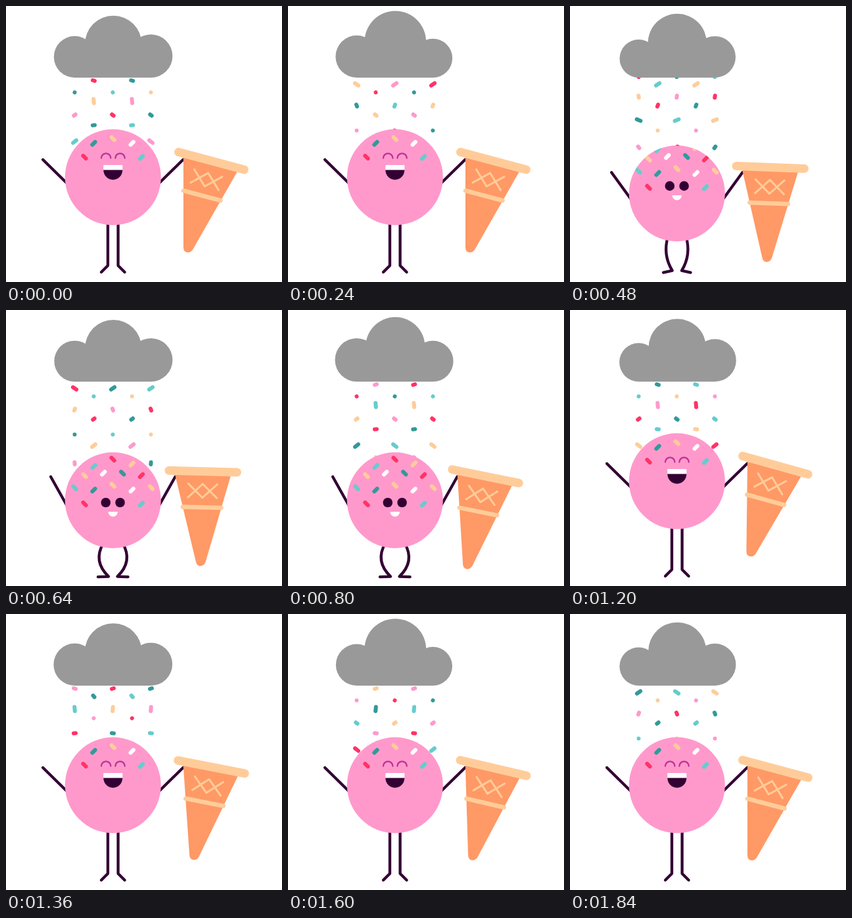
Recreate the animation shown at these times as an HTML page. Size 420 by 420 pixels, loop 1920 ms.

```html
<!DOCTYPE html>
<html lang="en">
<head>
<meta charset="utf-8">
<title>Sprinkle shower</title>
<style>
  html, body { margin: 0; width: 100%; height: 100%; overflow: hidden; background: #fff; }
  svg { display: block; width: 100%; height: 100%; }
</style>
</head>
<body>
<svg viewBox="0 0 420 420" fill="none" stroke-linecap="round" stroke-linejoin="round">
  <defs>
    <clipPath id="ballClip"><circle cx="162.8" cy="260.5" r="73"/></clipPath>
  </defs>
  <g id="rain" stroke-width="6"></g>
  <g fill="#999">
    <circle id="puffLeft" cx="104.5"/>
    <circle id="puffTop" cx="163.3"/>
    <circle id="puffRight" cx="220.5"/>
    <rect x="104.5" y="75" width="116" height="34"/>
  </g>
  <path id="limbs" stroke="#330033" stroke-width="4.3"/>
  <g id="ball">
    <circle cx="162.8" cy="260.5" r="73" fill="#ff99cc"/>
    <g clip-path="url(#ballClip)">
      <g id="skin">
        <g id="toppings" stroke-width="6"></g>
        <g id="laugh">
          <path d="M145 231.5a7.2 7.2 0 0 1 14.4 0M166.4 231.5a7.2 7.2 0 0 1 14.4 0" stroke="#bb3399" stroke-width="2.3"/>
          <path d="M148.3 242h29v8h-29z" fill="#fff"/>
          <path d="M148.3 249.5h29a14.5 15 0 0 1-29 0z" fill="#330033"/>
        </g>
        <g id="smile">
          <g fill="#330033"><circle cx="151.8" cy="228" r="7.3"/><circle cx="173.6" cy="228" r="7.3"/></g>
          <path d="M155.6 242h14.4a7.2 7.5 0 0 1-14.4 0z" fill="#fff"/>
        </g>
      </g>
    </g>
  </g>
  <g id="cone">
    <path d="M270 230V367Q270 375 277 375Q281 375 284 371L352 252Z" fill="#ff9966"/>
    <g stroke="#ffcc99">
      <path d="M262.5 222.3L362.5 249" stroke-width="13"/>
      <path d="M270 281L326.5 296" stroke-width="6.6"/>
      <path d="M-22 10.5L0-10.5L22 10.5M-22-10.5L0 10.5L22-10.5" stroke-width="3" transform="translate(305 264.3) rotate(15)"/>
    </g>
  </g>
</svg>
<script>
const LOOP = 1920, STEP = 80, CENTER = 162.8;
const TEAL = '#339999', CREAM = '#ffcc99', RED = '#ff3366', AQUA = '#66cccc', PINK = '#ff99cc', WHITE = '#fff';
const RAIN_COLORS = [TEAL, CREAM, RED, AQUA, PINK];
// x, cycle offset, colour offset, tumble direction
const COLUMNS = [[104.5, .8, 0, -1], [133.5, .2, 2, 1], [162.5, .8, 3, 1], [191.8, .2, 0, 1], [220.5, .8, 1, 1]];
const TOPPINGS = [
  [119.5, 230, RED, 1], [206, 230.5, AQUA, -1],
  [133.5, 209, TEAL, -1], [162.7, 201.7, CREAM, 1], [191.7, 209, WHITE, -1],
  [104.5, 205.5, AQUA, 1], [221, 205.3, CREAM, 1],
  [119.5, 187, CREAM, 1], [148.2, 183.2, WHITE, -1], [177.3, 183.2, TEAL, 1], [206, 187, RED, -1],
  [133.7, 173, AQUA, -1], [162.6, 162, RED, 1], [191.7, 169.3, CREAM, -1]
];
const CONE_SWING = [[0, 15], [240, 15], [560, 0], [1040, 23], [1320, 11], [1840, 15], [1920, 15]];

const el = id => document.getElementById(id);
const ramp = (t, from, to) => (1 - Math.cos(Math.PI * Math.min(1, Math.max(0, (t - from) / (to - from))))) / 2;
const mod = (a, n) => (a % n + n) % n;

function sprinkle(x, y, length, angle, color) {
  const h = length / 2;
  return `<path d="M${-h} 0H${h + .01}" stroke="${color}" transform="translate(${x} ${y}) rotate(${angle})"/>`;
}

function rain(t) {
  let out = '';
  for (const [x, start, shift, side] of COLUMNS) {
    const cycle = t / 400 + start;
    for (let k = 0; k < 4; k++) {
      const n = Math.floor(cycle + 1e-6) - k, age = cycle - n;
      const y = 108 + 27 * age + 2.9 * age * age;
      const length = 3.1 + 3.1 * Math.cos(2 * Math.PI * (age - .4) / .8);
      const turn = side * (mod(n, 5) % 3 ? -1 : 1);
      out += sprinkle(x, y, length, turn * (3 + 77 * age), RAIN_COLORS[mod(n + shift, 5)]);
    }
  }
  return out;
}

function puff(id, r, bottom) {
  el(id).setAttribute('r', r);
  el(id).setAttribute('cy', bottom - r);
}

function swing(t) {
  const i = CONE_SWING.findIndex(key => key[0] > t);
  const [t0, a] = CONE_SWING[i - 1], [t1, b] = CONE_SWING[i];
  return a + (b - a) * ramp(t, t0, t1);
}

function limbs(drop, nod) {
  const bend = Math.min(nod, drop * 1.25);
  const hand = [CENTER - 56.3 - 50.4 + nod / 3, 233.7 + drop - nod / 4];
  const hip = [155 - drop * .24, 326 + drop];
  const ankle = [155 + bend * .03, 395 + bend * .15 + drop * .18];
  const knee = [2 * (155 - drop * .1 - bend * .28) - (hip[0] + ankle[0]) / 2, (hip[1] + ankle[1]) / 2 + 2];
  const toe = [145 - bend * .14, 405 + bend * .03];
  const half = flip => {
    const p = ([x, y]) => `${flip ? 2 * CENTER - x : x} ${y}`;
    return `M${p(hand)}L${p([94, 271 + drop])}M${p(hip)}Q${p(knee)} ${p(ankle)}L${p(toe)}`;
  };
  el('limbs').setAttribute('d', half(false) + half(true));
  return [2 * CENTER - hand[0], hand[1]];
}

function draw(t) {
  const drop = 29 * (ramp(t, 240, 560) - ramp(t, 800, 1120));
  const nod = 36 * (ramp(t, 280, 640) - ramp(t, 840, 1200));
  const wave = lead => Math.cos(2 * Math.PI * (t * 3 / 2000 - lead));

  puff('puffLeft', 31 + 2 * wave(.2), 109);
  puff('puffTop', 45 + 2 * wave(.44), 101);
  puff('puffRight', 31.2 - 1.8 * wave(.44), 109);
  el('rain').innerHTML = rain(t);

  const [hx, hy] = limbs(drop, nod);
  el('ball').setAttribute('transform', `translate(0 ${drop})`);
  el('skin').setAttribute('transform', `translate(0 ${nod})`);
  const calm = t >= 400 && t < 1000;
  el('smile').setAttribute('display', calm ? 'inline' : 'none');
  el('laugh').setAttribute('display', calm ? 'none' : 'inline');
  el('cone').setAttribute('transform', `translate(${hx} ${hy}) rotate(${swing(t) - 15}) translate(-269.5 -233.7)`);
}

el('toppings').innerHTML = TOPPINGS.map(([x, y, color, lean]) => sprinkle(x, y, 6, 45 * lean, color)).join('');

const begin = performance.now();
function tick() {
  const t = (performance.now() - begin) % LOOP;
  draw(Math.floor(t / STEP) * STEP);
  requestAnimationFrame(tick);
}
tick();
</script>
</body>
</html>
```
